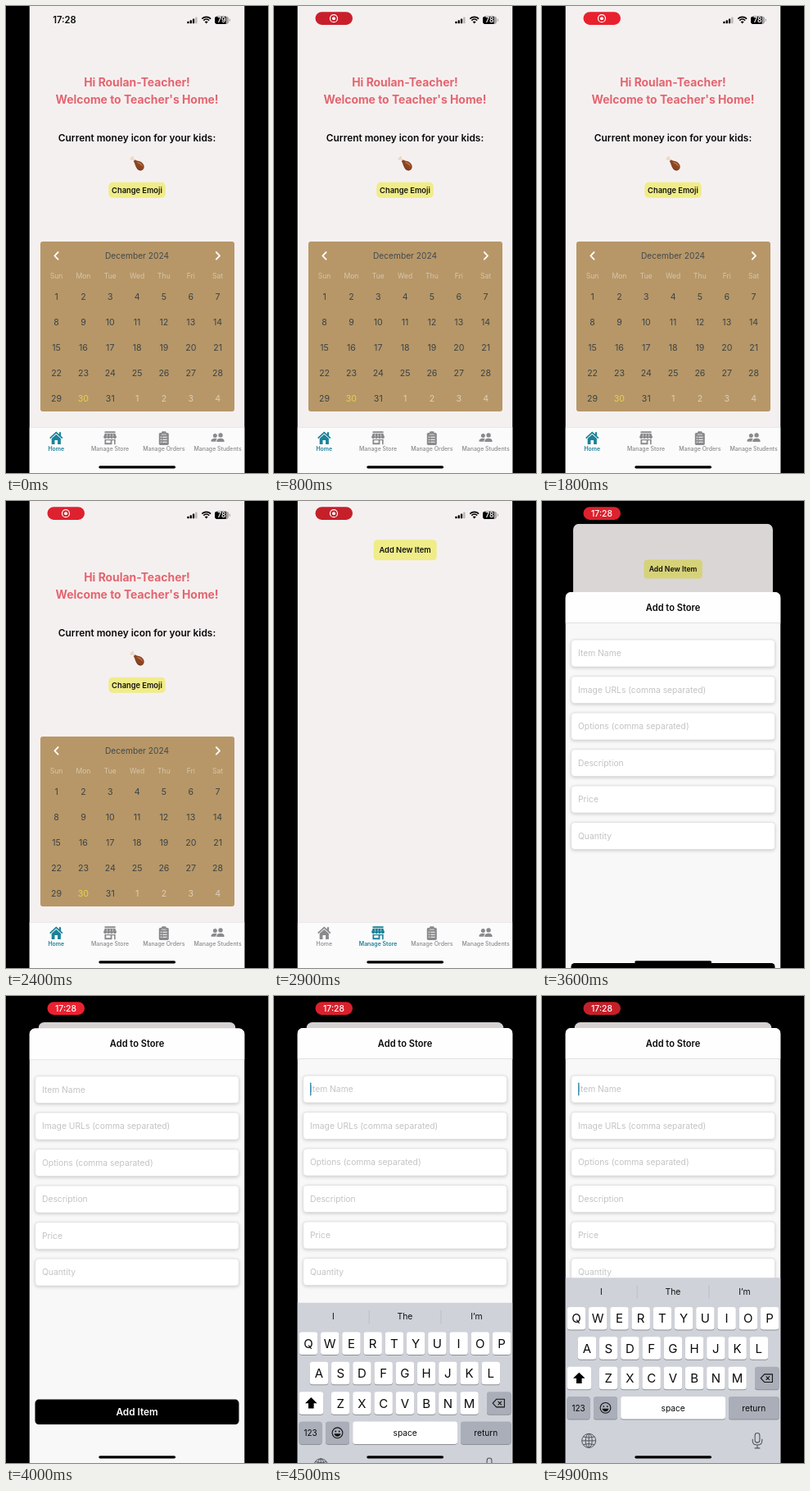
Recreate the animation shown at these times as an HTML page with a canvas. Size 320 px wide and 569 px high, loop 5 s.

```html
<!DOCTYPE html>
<html lang="en">
<head>
<meta charset="utf-8">
<title>Classroom store</title>
<style>
  html, body { margin: 0; width: 100%; height: 100%; overflow: hidden; background: #000; }
  canvas { display: block; width: 320px; height: 569px; }
</style>
</head>
<body>
<canvas id="stage"></canvas>
<script>
const W = 320, H = 569, LOOP = 5000;
const LEFT = 28.5, WIDTH = 263;
const PILL_AT = 400, STORE_AT = 2700, CLOCK_AT = 3250, SHEET_AT = 3350, KEYS_AT = 4250;
const PAGE = '#f5f0f0', YELLOW = '#f0ec88', TEAL = '#1c8199', GREY = '#8a8a8d';

const canvas = document.getElementById('stage');
const c = canvas.getContext('2d');
const dpr = window.devicePixelRatio || 1;
canvas.width = W * dpr;
canvas.height = H * dpr;

// Critically damped spring from 0 to 1
function spring(ms) {
  if (ms <= 0) return 0;
  const x = ms * 0.014;
  return 1 - (1 + x) * Math.exp(-x);
}

function rect(x, y, w, h, r, fill) {
  c.beginPath();
  c.roundRect(x, y, w, h, r);
  c.fillStyle = fill;
  c.fill();
}

function circle(x, y, r, fill) {
  c.beginPath();
  c.arc(x, y, r, 0, Math.PI * 2);
  c.fillStyle = fill;
  c.fill();
}

function path(d, color, line) {
  const p = new Path2D(d);
  if (line) {
    c.strokeStyle = color;
    c.lineWidth = line;
    c.stroke(p);
  } else {
    c.fillStyle = color;
    c.fill(p);
  }
}

// y is the middle of the capitals
function text(s, x, y, size, color, weight = 400, align = 'center') {
  c.font = `${weight} ${size}px Inter, "Liberation Sans", sans-serif`;
  c.textAlign = align;
  c.fillStyle = color;
  c.fillText(s, x, y + size * 0.36);
}

function at(x, y, draw) {
  c.save();
  c.translate(x, y);
  draw();
  c.restore();
}

function statusIcons(level) {
  [2.5, 4, 5.8, 7.8].forEach((h, i) =>
    rect(221.3 + i * 3.3, 21.3 - h, 2.3, h, 0.6, i < 3 ? '#000' : '#b9b5b5'));
  c.lineCap = 'butt';
  for (const r of [7.6, 4.8]) {
    c.beginPath();
    c.arc(244.7, 21, r, -Math.PI * 0.75, -Math.PI * 0.25);
    c.strokeStyle = '#000';
    c.lineWidth = 1.7;
    c.stroke();
  }
  path('M244.7 21.5L242.7 19.3Q244.7 17.7 246.7 19.3Z', '#000');
  c.save();
  c.beginPath();
  c.roundRect(255, 12.7, 17, 9.2, 2.8);
  c.clip();
  rect(255, 12, 17, 11, 0, '#a8a4a4');
  rect(255, 12, 13.6, 11, 0, '#000');
  c.restore();
  rect(272.8, 15.6, 1.1, 3.2, 0.5, '#a8a4a4');
  text(level, 263.3, 17.4, 8.4, '#fff', 600);
}

function recordPill(t) {
  const glow = 0.5 + 0.5 * Math.cos(t / 1000 * Math.PI);
  const mix = (a, b) => Math.round(a + (b - a) * glow);
  c.globalAlpha = Math.min(1, (t - PILL_AT) / 200);
  rect(50.5, 7.3, 45.5, 15.6, 7.8, `rgb(${mix(196, 236)},${mix(32, 33)},${mix(42, 48)})`);
  if (t < CLOCK_AT) {
    c.beginPath();
    c.arc(73, 15.2, 4.5, 0, Math.PI * 2);
    c.strokeStyle = '#fff';
    c.lineWidth = 1.2;
    c.stroke();
    circle(73, 15.2, 2, '#fff');
  } else {
    text('17:28', 73, 15.2, 10.4, '#fff', 500);
  }
  c.globalAlpha = 1;
}

const icons = {
  house(color) {
    path('M-7.6 .3L0 -6.6L7.6 .3', color, 1.7);
    path('M3.6 -7H5.8V-1.5L3.6 -3.5Z', color);
    path('M-5.6 .6L0 -4.4L5.6 .6V7.6H1.8V2.8H-1.8V7.6H-5.6Z', color);
  },
  shop(color) {
    rect(-6.6, -8, 13.2, 2, 0.4, color);
    path('M-6.4 -5.2H6.4L7.8 -1.2H-7.8Z', color);
    for (let i = 0; i < 4; i++) circle(-5.8 + i * 3.87, -1, 1.9, color);
    path('M-6.6 1.6H6.6V8H-6.6ZM-4.8 3V6H.6V3ZM2.4 3V8H5V3Z', color);
    path('M-3.6 -5V-1.6M0 -5V-1.6M3.6 -5V-1.6', '#fcfbfb', 0.6);
  },
  clipboard(color) {
    rect(-6, -6.4, 12, 15, 1.6, color);
    rect(-2.8, -8, 5.6, 3.6, 1.2, color);
    path('M-3 -4.2H3', '#fcfbfb', 0.7);
    for (const y of [-1, 2, 5]) {
      circle(-3.4, y, 0.7, '#fcfbfb');
      path(`M-1.6 ${y}H3.8`, '#fcfbfb', 1);
    }
  },
  people(color) {
    circle(-3.2, -2.9, 2.5, color);
    circle(3.5, -3.4, 2.7, color);
    path('M-8 4.5V3Q-7.4 .4 -3.4 .4Q-1.6 .4 -.8 1Q-2.2 2.4 -2.2 4.5Z', color);
    path('M-1.2 4.8V3.4Q-.6 .4 3.5 .4Q7.6 .4 8 3.4V4.8Z', color);
  }
};

function tabBar(active) {
  rect(LEFT, 513.5, WIDTH, 56, 0, '#fcfbfb');
  rect(LEFT, 513.2, WIDTH, 0.5, 0, '#dedbdb');
  const tabs = [['Home', 'house'], ['Manage Store', 'shop'],
    ['Manage Orders', 'clipboard'], ['Manage Students', 'people']];
  tabs.forEach(([label, icon], i) => {
    const x = 61.3 + i * 65.75, color = i === active ? TEAL : GREY;
    at(x, 526.3, () => icons[icon](color));
    text(label, x, 539.7, 6.95, color, i === active ? 600 : 500);
  });
}

function drumstick() {
  at(160.3, 191.8, () => {
    c.rotate(Math.PI / 4);
    rect(-9.5, -1, 7, 2, 1, '#ead9c4');
    circle(-9.2, -1.2, 1.5, '#ead9c4');
    circle(-9.2, 1.2, 1.5, '#ead9c4');
    path('M-5 -1.4C-1 -2.2 0 -4.8 4 -4.8C8.4 -4.8 10.3 -2 10.3 .6C10.3 3.4 7.6 5 4 4.6C0 4.2 -1.6 1.8 -5 1.4Z', '#8a4523');
    path('M-1 -1.4C2 -3.6 5.4 -4 8 -1.6C5.4 -2.2 2 -1.4 -1 -.4Z', '#bd713c');
    path('M1 3.2C4 4.4 8 4 9.6 1.4C9.4 4.2 4.6 5.4 1 3.2Z', '#5e2a17');
  });
}

function calendar() {
  rect(42, 287, 237, 207, 3, '#b79767');
  c.lineCap = c.lineJoin = 'round';
  path('M63.6 300L59.4 304.3L63.6 308.6M256.8 300L261 304.3L256.8 308.6', '#fff', 1.8);
  c.lineCap = 'butt';
  c.lineJoin = 'miter';
  text('December 2024', 160, 304.3, 10.2, '#414a50');
  const col = i => 61.6 + 32.83 * i;
  ['Sun', 'Mon', 'Tue', 'Wed', 'Thu', 'Fri', 'Sat'].forEach((d, i) =>
    text(d, col(i), 329.2, 8.6, '#d6c6ae'));
  for (let i = 0; i < 35; i++) {
    const color = i === 29 ? '#e6d24a' : i > 30 ? '#dccfba' : '#39434a';
    text(i > 30 ? i - 30 : i + 1, col(i % 7), 354.4 + 31 * Math.floor(i / 7), 10.6, color);
  }
}

function homePage() {
  rect(LEFT, 0, WIDTH, H, 0, PAGE);
  text('Hi Roulan-Teacher!', 160, 93, 13.9, '#e3656f', 700);
  text("Welcome to Teacher's Home!", 160, 114, 13.9, '#e3656f', 700);
  text('Current money icon for your kids:', 160, 160.4, 11.9, '#0a0a0a', 600);
  drumstick();
  rect(125.3, 214.7, 69.5, 19, 5, YELLOW);
  text('Change Emoji', 160, 224.2, 9.3, '#111', 600);
  calendar();
  tabBar(0);
}

// Slides back and dims as the sheet comes up
function storePage(p) {
  const scale = 1 - 0.084 * p;
  c.save();
  c.translate(160, 32 * p);
  c.scale(scale, scale);
  c.translate(-160, 0);
  c.beginPath();
  c.roundRect(LEFT, 0, WIDTH, H, p > 0 ? [8, 8, 0, 0] : 0);
  c.clip();
  rect(LEFT, 0, WIDTH, H, 0, PAGE);
  rect(121.7, 47.2, 77, 25, 4.5, YELLOW);
  text('Add New Item', 160, 59.6, 9.35, '#111', 600);
  tabBar(1);
  if (p > 0) rect(LEFT, 0, WIDTH, H, 0, `rgba(0,0,0,${0.125 * p})`);
  c.restore();
}

function field(label, y) {
  c.save();
  c.shadowColor = 'rgba(0,0,0,.2)';
  c.shadowBlur = 4 * dpr;
  c.shadowOffsetY = 1.2 * dpr;
  rect(35.7, y, 248.8, 33, 4, '#fff');
  c.restore();
  c.strokeStyle = '#dcdcdc';
  c.lineWidth = 0.7;
  c.stroke();
  text(label, 44, y + 16.6, 10.3, '#c3c3c5', 400, 'left');
}

function sheet(p, t) {
  at(0, (H - 39) * (1 - p), () => {
    rect(LEFT, 39, WIDTH, H, [7, 7, 0, 0], '#f8f8f8');
    rect(LEFT, 39, WIDTH, 37.5, [7, 7, 0, 0], '#fefefe');
    rect(LEFT, 76.3, WIDTH, 0.7, 0, '#d8d8d8');
    text('Add to Store', 160, 57.7, 11.1, '#0a0a0a', 600);
    ['Item Name', 'Image URLs (comma separated)', 'Options (comma separated)',
      'Description', 'Price', 'Quantity'].forEach((s, i) => field(s, 97 + 44.5 * i));
    if (t >= KEYS_AT) rect(44, 105.5, 1.5, 16, 0.7, '#3d8fb0');
    rect(35.5, 491, 249, 30.5, 4.5, '#000');
    text('Add Item', 160, 506.4, 11.8, '#fff', 600);
  });
}

function key(x, y, w, fill = '#fff', label = '', size = 10.2) {
  rect(x, y + 0.9, w, 27.6, 3.3, '#8d9096');
  rect(x, y, w, 27.6, 3.3, fill);
  if (label) text(label, x + w / 2, y + 14, size, '#0a0a0a');
}

function keyRow(letters, x, y) {
  [...letters].forEach((s, i) => key(x + 26.23 * i, y, 22.4, '#fff', s, 15));
}

function keyboard(p) {
  const dark = '#a9aeb8', ink = '#50545b';
  at(0, 226 * (1 - p), () => {
    rect(LEFT, 343, WIDTH, 226, 0, '#cfd2d9');
    ['I', 'The', 'I’m'].forEach((s, i) => text(s, 72.3 + 87.6 * i, 360, 10.4, '#111'));
    rect(115.8, 352, 0.7, 16.5, 0, '#b3b7bf');
    rect(203.6, 352, 0.7, 16.5, 0, '#b3b7bf');
    keyRow('QWERTYUIOP', 30.8, 378.7);
    keyRow('ASDFGHJKL', 43.8, 415);
    keyRow('ZXCVBNM', 70, 451.5);

    key(30.6, 451.5, 29.6);
    path('M45.3 458.4L52.6 465.6H48.6V471.8H42V465.6H38Z', '#000');
    key(260, 451.5, 29.6, dark);
    c.lineJoin = 'round';
    path('M267.2 465.4L271.6 460.6H281.4V470.2H271.6ZM273.6 463.2L278 467.6M278 463.2L273.6 467.6', '#111', 1.1);
    c.lineJoin = 'miter';

    key(30.6, 487.7, 28, dark, '123', 10);
    key(63, 487.7, 29, dark);
    at(77.5, 501.6, () => {
      c.beginPath();
      c.arc(0, 0, 6.4, 0, Math.PI * 2);
      c.strokeStyle = '#111';
      c.lineWidth = 1.1;
      c.stroke();
      circle(-2.2, -1.8, 0.9, '#111');
      circle(2.2, -1.8, 0.9, '#111');
      path('M-4 1H4Q3.2 4.4 0 4.4Q-3.2 4.4 -4 1Z', '#111');
    });
    key(96.2, 487.7, 127.8, '#fff', 'space');
    key(228, 487.7, 61.6, dark, 'return');

    at(57.2, 541.6, () => {
      c.strokeStyle = ink;
      c.lineWidth = 1;
      for (const rx of [8.5, 4]) {
        c.beginPath();
        c.ellipse(0, 0, rx, 8.5, 0, 0, Math.PI * 2);
        c.stroke();
      }
      path('M0 -8.5V8.5M-8.5 0H8.5M-7 -4.8Q0 -2.6 7 -4.8M-7 4.8Q0 2.6 7 4.8', ink, 1);
    });
    c.beginPath();
    c.roundRect(260.1, 532.3, 5.8, 11.6, 2.9);
    c.strokeStyle = ink;
    c.lineWidth = 1.1;
    c.stroke();
    path('M257.2 539.4V541.4Q257.2 546.8 263 546.8Q268.8 546.8 268.8 541.4V539.4M263 546.8V550.4M259.6 550.6H266.4', ink, 1.1);
  });
}

function draw(t) {
  c.setTransform(dpr, 0, 0, dpr, 0, 0);
  rect(0, 0, W, H, 0, '#000');
  const up = spring(t - SHEET_AT);
  c.save();
  c.beginPath();
  c.rect(LEFT, 0, WIDTH, H);
  c.clip();
  if (t < STORE_AT) homePage();
  else storePage(up);
  if (up > 0) sheet(up, t);
  else statusIcons(t < PILL_AT ? '79' : '78');
  if (t > KEYS_AT) keyboard(spring(t - KEYS_AT));
  if (t < PILL_AT) text('17:28', 71.5, 17.4, 11.2, '#0a0a0a', 600);
  else recordPill(t);
  rect(113.3, 560.2, 93.8, 3.3, 1.65, '#000');
  c.restore();
}

let start;
function tick(now) {
  start ??= now;
  draw((now - start) % LOOP);
  requestAnimationFrame(tick);
}
requestAnimationFrame(tick);
</script>
</body>
</html>
```
